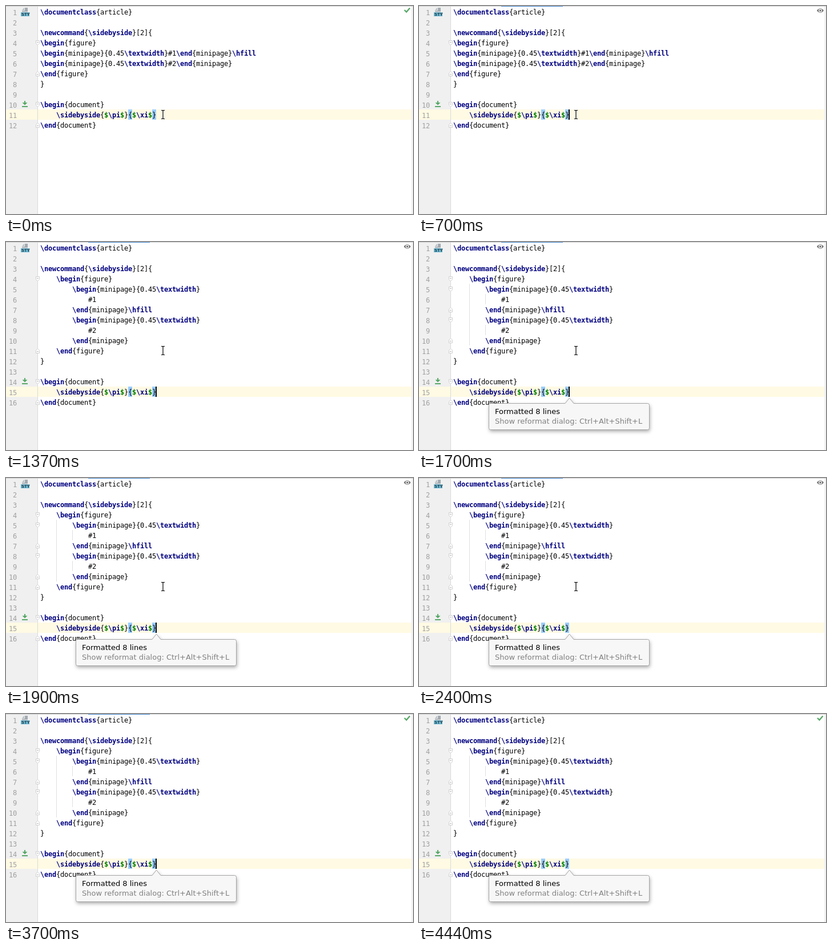
Animation, 713 px wide and 364 px high, one loop 4.48 s. Source, as an HTML page with a canvas:

```html
<!DOCTYPE html>
<html lang="en">
<head>
<meta charset="utf-8">
<title>Reformatting LaTeX</title>
<style>
  html, body { margin: 0; width: 100%; height: 100%; overflow: hidden; background: #fff; }
  canvas { display: block; }
</style>
</head>
<body>
<canvas id="stage" width="713" height="364"></canvas>
<script>
const ctx = document.getElementById('stage').getContext('2d');
const LOOP = 4480, ROW = 18, CELL = 7, TEXT_X = 60;
const MONO = '"DejaVu Sans Mono", monospace';
const SANS = '"DejaVu Sans", sans-serif';

// Times in ms
const FOCUS = 500, REFORMAT = 1100, FOLDS = 1500, POPUP = 1690;
const MOUSE_MOVE = 2430, MOUSE_GONE = 2465, ANALYSED = 3100, BLUR = 4065;
const BLINK_START = 2066, BLINK = 533.3;

const tail = String.raw`
\begin{document}
    \sidebyside{$\pi$}{$\xi$}
\end{document}`;

const before = {
  lines: (String.raw`\documentclass{article}

\newcommand{\sidebyside}[2]{
\begin{figure}
\begin{minipage}{0.45\textwidth}#1\end{minipage}\hfill
\begin{minipage}{0.45\textwidth}#2\end{minipage}
\end{figure}
}
` + tail).split('\n'),
  caretRow: 11, opens: [4, 10], closes: [7, 12]
};

const after = {
  lines: (String.raw`\documentclass{article}

\newcommand{\sidebyside}[2]{
    \begin{figure}
        \begin{minipage}{0.45\textwidth}
            #1
        \end{minipage}\hfill
        \begin{minipage}{0.45\textwidth}
            #2
        \end{minipage}
    \end{figure}
}
` + tail).split('\n'),
  caretRow: 15, opens: [4, 14], closes: [11, 16]
};

const rowTop = n => 1 + ROW * (n - 1);

function rect(x, y, w, h, color) {
  ctx.fillStyle = color;
  ctx.fillRect(x, y, w, h);
}

function path(points, close) {
  ctx.beginPath();
  points.forEach(([x, y]) => ctx.lineTo(x, y));
  if (close) ctx.closePath();
}

function stroke(color, width) {
  ctx.strokeStyle = color;
  ctx.lineWidth = width;
  ctx.stroke();
}

function fill(color) {
  ctx.fillStyle = color;
  ctx.fill();
}

function label(text, x, y, font, color) {
  ctx.font = font;
  ctx.fillStyle = color;
  ctx.fillText(text, x, y);
}

// Every character sits in its own editor cell.
function cells(text, x, y, font, color) {
  [...text].forEach((ch, i) => {
    if (ch !== ' ') label(ch, x + i * CELL, y, font, color);
  });
}

function codeLine(text, row) {
  const y = rowTop(row) + 14;
  for (const { 0: token, index } of text.matchAll(/\\[a-z]+|\$|[^\\$]+/g)) {
    const special = /[\\$]/.test(token);
    const color = token === '$' ? '#008000' : special ? '#000080' : '#000';
    cells(token, TEXT_X + index * CELL, y, (special ? 'bold ' : '') + '12px ' + MONO, color);
  }
}

function foldMark(row, dir) {
  const y = rowTop(row) + 9.5;
  path([[52.5, y - 4 * dir], [58.5, y - 4 * dir], [58.5, y + dir], [55.5, y + 4 * dir], [52.5, y + dir]], true);
  fill('#fff');
  stroke('#cfcfcf', 1);
  rect(54, y - 0.5 - dir, 3, 1, '#b8b8b8');
}

function styleIcon() {
  path([[33, 3], [38, 3], [38, 10], [28, 10], [28, 8], [33, 8]], true);
  fill('#a3abb1');
  path([[28, 7], [32, 3], [32, 7]], true);
  fill('#b4bbc0');
  rect(26, 11, 15, 7, '#6bb8d3');
  label('STY', 27, 17.2, 'bold 7px ' + SANS, '#2b4550');
}

function runIcon(row) {
  const y = rowTop(row);
  rect(32, y + 3, 2, 5, '#59a869');
  path([[28.5, y + 6], [37.5, y + 6], [33, y + 10.5]], true);
  fill('#59a869');
  rect(28, y + 12, 10, 2, '#59a869');
}

function checkIcon() {
  path([[698, 7], [701.5, 10.5], [707.5, 3.5]]);
  stroke('#59a869', 2.4);
}

function eyeIcon() {
  ctx.beginPath();
  ctx.moveTo(697, 8);
  ctx.quadraticCurveTo(703, 0.5, 709, 8);
  ctx.quadraticCurveTo(703, 15.5, 697, 8);
  fill('#6e6e6e');
  for (const [r, color] of [[3, '#fff'], [1.8, '#6e6e6e']]) {
    ctx.beginPath();
    ctx.arc(703, 8, r, 0, 2 * Math.PI);
    fill(color);
  }
}

function mouse(x, y) {
  const beam = () => {
    path([[x - 3, y - 7.5], [x - 1, y - 7.5], [x, y - 6.5], [x + 1, y - 7.5], [x + 3, y - 7.5]]);
    ctx.moveTo(x, y - 7);
    ctx.lineTo(x, y + 7);
    ctx.moveTo(x - 3, y + 7.5);
    ctx.lineTo(x - 1, y + 7.5);
    ctx.lineTo(x, y + 6.5);
    ctx.lineTo(x + 1, y + 7.5);
    ctx.lineTo(x + 3, y + 7.5);
  };
  beam();
  stroke('#fff', 2.6);
  beam();
  stroke('#000', 1.2);
}

function popup() {
  const left = 122.5, right = 403.5, top = 282.5, bottom = 328.5, r = 3;
  ctx.beginPath();
  ctx.moveTo(left + r, top);
  ctx.lineTo(256, top);
  ctx.lineTo(263.5, 273);
  ctx.lineTo(271, top);
  ctx.arcTo(right, top, right, bottom, r);
  ctx.arcTo(right, bottom, left, bottom, r);
  ctx.arcTo(left, bottom, left, top, r);
  ctx.arcTo(left, top, right, top, r);
  ctx.closePath();
  ctx.save();
  ctx.shadowColor = 'rgba(0, 0, 0, .35)';
  ctx.shadowBlur = 6;
  ctx.shadowOffsetX = 1;
  ctx.shadowOffsetY = 3;
  fill('#f7f7f7');
  ctx.restore();
  stroke('#a5a5a5', 1);
  label('Formatted 8 lines', 133, 301, '13px ' + SANS, '#000');
  label('Show reformat dialog: Ctrl+Alt+Shift+L', 133, 318, '13px ' + SANS, '#808080');
}

function caretVisible(t) {
  if (t < FOCUS) return false;
  return t < BLINK_START || Math.floor((t - BLINK_START) / BLINK) % 2 === 1;
}

function draw(t) {
  const doc = t < REFORMAT ? before : after;
  const top = rowTop(doc.caretRow);
  const folded = t >= FOLDS;

  rect(0, 0, 713, 364, '#fff');
  rect(0, 0, 55, 364, '#f0f0f0');
  rect(710, 0, 3, 364, '#f2f2f2');
  rect(0, top, 710, ROW, '#fffae3');
  rect(55, 0, 1, 364, '#dadada');
  rect(0, 0, 713, 1, '#d1d1d1');
  if (t >= FOCUS && t < BLUR) rect(144, 0, 108, 1, '#4083c9');

  if (folded) {
    rect(88, rowTop(5), 1, 6 * ROW, '#dfdfdf');
    for (const row of [6, 9]) rect(116, rowTop(row), 1, ROW, '#dfdfdf');
  }

  for (const col of [22, 28]) rect(TEXT_X + col * CELL, top, CELL, ROW, '#99ccff');
  doc.lines.forEach((line, i) => {
    const number = String(i + 1);
    cells(number, 19 - number.length * CELL, rowTop(i + 1) + 15, '12px ' + MONO, '#a0a0a0');
    codeLine(line, i + 1);
  });

  for (const row of [...doc.opens, ...(folded ? [5, 8] : [])]) foldMark(row, 1);
  for (const row of [...doc.closes, ...(folded ? [7, 10] : [])]) foldMark(row, -1);

  styleIcon();
  runIcon(doc.caretRow - 1);
  if (t >= FOCUS && t < ANALYSED) eyeIcon();
  else checkIcon();

  if (caretVisible(t)) rect(262, top, 2, ROW, '#000');
  if (t >= POPUP) popup();
  if (t < MOUSE_MOVE) mouse(275, 190);
  else if (t < MOUSE_GONE) mouse(431, 294);
}

const start = performance.now();
function tick() {
  draw((performance.now() - start) % LOOP);
  requestAnimationFrame(tick);
}
tick();
</script>
</body>
</html>
```
